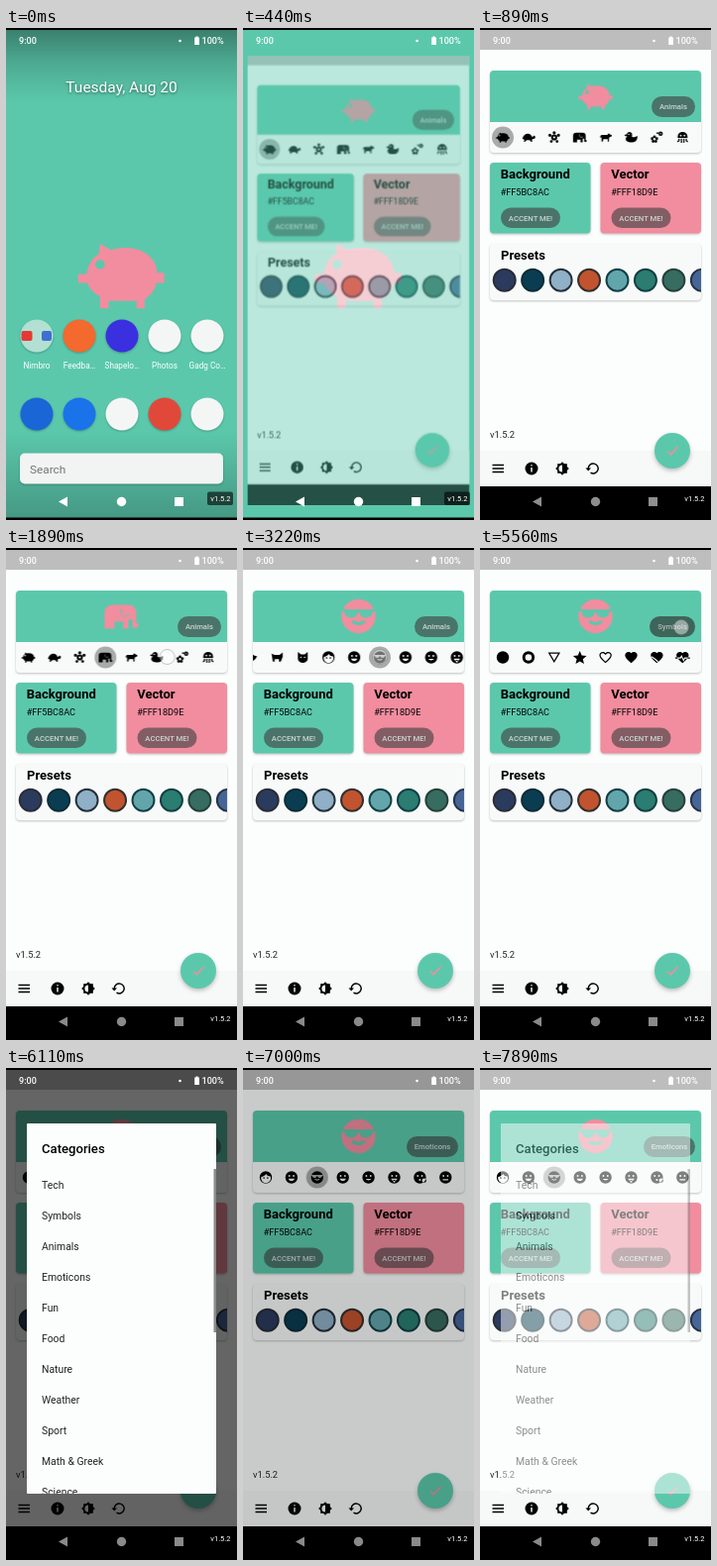
Write an HTML page that moves like this. It is 233 by 497 pixels and loops after 8000 ms.

```html
<!DOCTYPE html>
<html lang="en">
<head>
<meta charset="utf-8">
<title>Wallpaper picker</title>
<style>
  html, body { margin: 0; width: 100%; height: 100%; overflow: hidden; background: #000; }
  #stage { position: relative; width: 233px; height: 497px; overflow: hidden; }
  #stage > svg { position: absolute; left: 0; top: 0; width: 233px; height: 497px; }
  text { font-family: Roboto, sans-serif; }
  path { fill-rule: evenodd; }
  .card { filter: drop-shadow(0 1px .9px rgba(0, 0, 0, .24)); }
  .title { font-size: 13px; font-weight: 700; }
  .hex { font-size: 9.1px; }
  .chip { fill: rgba(66, 66, 66, .62); }
  .chipText { font-size: 7.7px; font-weight: 500; fill: #c9d6d1; text-anchor: middle; }
  .label { font-size: 8.2px; fill: #fff; text-anchor: middle; }
  .status { font-size: 9.1px; font-weight: 500; fill: #fff; }
  #app { transform-origin: 117px 411px; }
</style>
</head>
<body>
<div id="stage">
  <svg id="home">
    <defs>
      <linearGradient id="shade" x1="0" y1="0" x2="0" y2="1">
        <stop offset="0" stop-opacity=".37"/>
        <stop offset=".07" stop-opacity=".15"/>
        <stop offset=".15" stop-opacity="0"/>
        <stop offset=".82" stop-opacity="0"/>
        <stop offset="1" stop-opacity=".24"/>
      </linearGradient>
    </defs>
    <rect width="233" height="497" fill="#5bc8ac"/>
    <g id="wallPig"></g>
    <g id="launcher">
      <rect width="233" height="497" fill="url(#shade)"/>
      <text x="116.5" y="65.400" font-size="15.500" fill="#fff" text-anchor="middle" style="filter:drop-shadow(0 1px 1.5px rgba(0,0,0,.5))">Tuesday, Aug 20</text>
      <g id="apps"></g>
      <rect class="card" x="14" y="429.500" width="205" height="31" rx="5" fill="#f1f4f2"/>
      <text x="24" y="449.500" font-size="11.800" fill="#757575">Search</text>
    </g>
  </svg>

  <svg id="app">
    <defs>
      <clipPath id="rowClip"><rect x="10" y="95" width="213" height="31"/></clipPath>
      <clipPath id="presetClip"><rect x="10" y="218" width="213" height="57" rx="4"/></clipPath>
    </defs>
    <rect width="233" height="497" fill="#fcfefd"/>
    <rect width="233" height="22" fill="#bdbdbd"/>

    <rect class="card" x="10" y="43" width="213" height="83" rx="4" fill="#f8faf9"/>
    <path d="M10 95V47a4 4 0 0 1 4-4H219a4 4 0 0 1 4 4V95Z" fill="#5bc8ac"/>
    <g id="art" fill="#f18d9e"></g>
    <g id="chips"></g>
    <g clip-path="url(#rowClip)"><g id="strip"></g></g>

    <g id="colors"></g>

    <rect class="card" x="10" y="218" width="213" height="57" rx="4" fill="#f8faf9"/>
    <text class="title" x="21" y="234">Presets</text>
    <g id="presets" clip-path="url(#presetClip)"></g>

    <text x="10" y="414" font-size="9.300" fill="#222">v1.5.2</text>
    <rect y="427" width="233" height="36" fill="#f7f9f8"/>
    <path d="M12.500 441.500H24M12.500 445H24M12.500 448.500H24" stroke="#000" stroke-width="1.300"/>
    <circle cx="52" cy="445" r="6.500"/>
    <path d="M52 444V448.500M52 441.200V442.600" stroke="#fff" stroke-width="1.400"/>
    <g transform="translate(83 445)">
      <rect x="-4.800" y="-4.800" width="9.600" height="9.600"/>
      <rect x="-4.800" y="-4.800" width="9.600" height="9.600" transform="rotate(45)"/>
      <path d="M0-3.600A3.600 3.600 0 0 0 0 3.600Z" fill="#f7f9f8"/>
    </g>
    <path d="M109.200 445A5 5 0 1 1 111.500 449.200" fill="none" stroke="#000" stroke-width="1.400"/>
    <path d="M106.500 444.500H112L109.200 447.600Z"/>
    <circle cx="194" cy="427" r="18" fill="#5bc8ac" style="filter:drop-shadow(0 2px 2px rgba(0,0,0,.25))"/>
    <path d="M189 427.500L192.300 430.800L199.500 423" fill="none" stroke="#f18d9e" stroke-width="1.500"/>
    <rect y="463" width="233" height="34"/>
  </svg>

  <svg id="dim"><rect width="233" height="463"/></svg>

  <svg id="dialog">
    <defs><clipPath id="listClip"><rect x="21" y="100" width="191" height="330"/></clipPath></defs>
    <rect x="21" y="56" width="191" height="374" rx="1" fill="#fcfefd"/>
    <text x="36" y="86" font-size="13.100" font-weight="500">Categories</text>
    <g id="items" clip-path="url(#listClip)" font-size="10.400" fill="#222"></g>
    <rect x="209.500" y="102" width="2.500" height="165" fill="#8b8b8b"/>
  </svg>

  <svg id="top">
    <rect width="233" height="2"/>
    <rect y="494.500" width="233" height="3"/>
    <text class="status" x="13" y="16.200">9:00</text>
    <circle cx="175.500" cy="13" r="1.300" fill="#fff"/>
    <path d="M191.500 8.500H193.700V9.500H195V17H190.200V9.500H191.500Z" fill="#fff"/>
    <text class="status" x="197.500" y="16.200">100%</text>
    <g id="nav">
      <path d="M53 478.500L62 473.500V483.500Z"/>
      <circle cx="116.500" cy="478.500" r="4.700"/>
      <rect x="170" y="474" width="9" height="9"/>
    </g>
    <rect x="203" y="468.500" width="26" height="13.500" rx="2" fill="rgba(0,0,0,.6)"/>
    <text x="206.300" y="478" font-size="7.500" fill="#fff">v1.5.2</text>
    <circle id="touch" r="7.500" fill="rgba(255,255,255,.45)" stroke="rgba(110,110,110,.4)"/>
  </svg>
</div>

<script>
const LOOP = 8000, STEP = 25.9, FIRST = 22.5;
const $ = id => document.getElementById(id);
const sheet = document.head.appendChild(document.createElement('style'));

// frames: [ms, css] pairs turned into looping CSS keyframes
function keys(id, frames, timing = 'linear') {
  const body = [...frames, [LOOP, frames.at(-1)[1]]]
    .map(([ms, css]) => `${ms / LOOP * 100}%{${css}}`).join('');
  sheet.append(`@keyframes k-${id}{${body}}#${id}{animation:k-${id} ${LOOP}ms ${timing} infinite}\n`);
}
const fade = (id, pairs, timing) => keys(id, pairs.map(([ms, o]) => [ms, `opacity:${o}`]), timing);
const show = (id, from, to) => fade(id, [...(from ? [[0, 0]] : []), [from, 1], ...(to ? [[to, 0]] : [])], 'step-end');

// icon shapes on a 24 unit grid
const disc = (x, y, r) => `M${x - r} ${y}a${r} ${r} 0 1 0 ${2 * r} 0a${r} ${r} 0 1 0 ${-2 * r} 0Z`;
const face = more => disc(12, 12, 10) + more;
const eyes = disc(8.5, 9.5, 1.5) + disc(15.5, 9.5, 1.5);
const smile = 'M7 14H17C16 19 8 19 7 14Z';
const heart = 'M12 21.3L10.5 20C5.4 15.4 2 12.3 2 8.5C2 5.4 4.4 3 7.5 3C9.2 3 10.9 3.8 12 5.1C13.1 3.8 14.8 3 16.5 3C19.6 3 22 5.4 22 8.5C22 12.3 18.6 15.4 13.5 20Z';

const symbols = [
  disc(12, 12, 10),
  disc(12, 12, 10) + disc(12, 12, 5.3),
  'M2 4H22L12 21ZM5.5 6H18.5L12 17Z',
  'M12 1.5L15.1 8.8L23 9.5L17 14.7L18.8 22.5L12 18.3L5.2 22.5L7 14.7L1 9.5L8.9 8.8Z',
  heart + 'M12 18.7C7 14.200 4 11.500 4 8.500C4 4.500 9 3.500 11.200 7.500H12.800C15 3.500 20 4.500 20 8.500C20 11.500 17 14.200 12 18.700Z',
  heart,
  heart + 'M3 11.5C8 15 11 17 13 20L14.500 19C12 15.500 9 13.500 4 10Z',
  heart + 'M0 12H8L10.500 8L13.500 15L15 12H24V14H16L13.500 19L10.500 12L9 14H0Z'
];
const animals = [
  'M6.6 4L9.4 5.6C10.5 5.2 11.8 5 13 5C17.6 5 21 7.600 21.200 11.400H23V14H21C20.600 15.800 19.600 17.200 18 18.200V20.500H15.900V18.600H8.800V20.500H6.600V17.500C5 16.600 3.800 15.300 3.300 14H1V11.700H3.200C3.500 9.600 4.500 7.700 6.300 6.600Z' + disc(6.6, 9.3, 1.2),
  'M2 14C4 8 8 6 11 6C15 6 17 9 18 12L20 9.500C21.500 9 23 10 23 12C23 13.500 21 14.500 19 14.500L17.500 16L18.500 19H15.500L14 16.500H9L7 19H4L5.500 16Z',
  disc(12, 12, 5) + disc(12, 12, 1.8) + disc(12, 4.3, 2.5) + disc(5, 8.5, 2.5) + disc(19, 8.5, 2.5) + disc(7.3, 18.6, 2.3) + disc(16.7, 18.6, 2.3),
  'M1 20V9.500A5 5 0 0 1 6 4.500H16.500A5 5 0 0 1 21.500 9.500V16.500H23V17.500A1.800 1.800 0 0 1 19 17.500V14H16.500V20H13V15.500H7.500V20ZM11.500 7H12.200V10.500A2.500 2.500 0 0 0 16.500 10.500H17.200A3.200 3.200 0 0 1 11.500 10.500Z',
  'M4 9L5.500 8H15L17 5L18 6.500L22 8.500V10.500L18.500 11.500L17.500 14V19H15.500V15H8.500L7.500 19H5.500V14L4.500 11L2.500 13Z',
  'M9 3A5 5 0 0 1 13.500 8C13.500 10 12.500 11 14 11.500C17 12 19 11 22 9.500C22.500 15 20 20 14 20H10C5 20 3 17 3 14.500C3 12 5 11.500 5.500 10.500L1.500 9.500V7.500L4.500 7A5 5 0 0 1 9 3Z' + disc(8, 7, 1.1),
  [[8, 11], [4.3, 14], [5.8, 18.4], [10.2, 18.4], [11.7, 14]].map(p => disc(...p, 2.3)).join('') + disc(18, 6, 3.6) + disc(18, 6, 1) + disc(12.8, 5, 1.4),
  'M4 11A8 8 0 0 1 20 11V13H4ZM5 14H7V18L4 20L3 18.500L5 17ZM17 14H19V17L21 18.500L20 20L17 18ZM9 14H11V21H9ZM13 14H15V21H13Z' + disc(9, 9, 1.4) + disc(15, 9, 1.4),
  'M2 12C6 6 13 6 17 11L22 7V17L17 13C13 18 6 18 2 12Z' + disc(6.5, 11, 1),
  'M3 8L8 4C13 5 13 9 21 10C19 17 12 19 8 18L6 21V16C4 13 6 10 3 8Z',
  'M3 6L8 8H16L21 4V11L18 19H15V15H8V19H5Z',
  'M4 3L9 7H15L20 3V14A8 7 0 0 1 4 14Z' + disc(9, 12, 1.2) + disc(15, 12, 1.2)
];
const cool = face('M3.200 7.300L4 8H20L20.800 7.300L21.400 8.600L20 10C20 11.800 18 12.800 16.300 12.800C14.300 12.800 12.750 11.800 12.750 10H11.250C11.250 11.800 9.700 12.800 7.700 12.800C6 12.800 4 11.800 4 10L2.600 8.600ZM7.800 15.400L9.200 14C10 15.600 14 15.600 14.800 14L16.200 15.400C14.500 17.800 9.500 17.800 7.800 15.400Z');
const emoticons = [
  face('M4.500 11C9 10.500 11 9 12.500 6.500C14 9.500 17 10.500 19.700 10.500A8 8 0 1 1 4.500 11Z' + disc(9, 13, 1.3) + disc(15, 13, 1.3)),
  face(eyes + smile),
  cool,
  face(eyes + smile),
  face(eyes + 'M7.500 14.500H16.500C15 17.500 9 17.500 7.500 14.500Z'),
  face(eyes + smile + 'M10.500 16H13.500V19A1.500 1.500 0 0 1 10.500 19Z'),
  face(eyes + disc(12, 16, 1.7) + disc(19, 17, 3.5)),
  face(eyes + 'M7.500 15H16.500V17H7.500Z')
];
const icon = (d, x, y, s) => `<path d="${d}" transform="translate(${x - 12 * s} ${y - 12 * s}) scale(${s})"/>`;

// home screen
$('wallPig').innerHTML = `<path d="${animals[0]}" fill="#f18d9e" transform="translate(68.800 202.200) scale(3.950)"/>`;
const cols = [31, 74, 117, 160, 203];
const rowOne = [['#b2e0d3', 'Nimbro'], ['#f4692e', 'Feedba…'], ['#3a30e0', 'Shapelo…'], ['#f4f6f5', 'Photos'], ['#f4f6f5', 'Gadg Co…']];
const dock = ['#1a66d6', '#1a73e8', '#f4f6f5', '#e0493a', '#f4f6f5'];
const dot = (x, y, c) => `<circle class="card" cx="${x}" cy="${y}" r="16.500" fill="${c}"/>`;
$('apps').innerHTML = cols.map((x, i) =>
  dot(x, 311, rowOne[i][0]) + dot(x, 390, dock[i]) +
  `<text class="label" x="${x}" y="344">${rowOne[i][1]}</text>`).join('') +
  '<rect x="15.500" y="306" width="11" height="10" rx="2" fill="#e53935"/><rect x="36" y="306" width="10" height="10" rx="2" fill="#3f6fd0"/>';

// icon row, with the selection mark riding along
$('strip').innerHTML = '<circle id="mark" cy="110.500" r="11" fill="#a9aaaa"/>' +
  [...symbols, ...animals, ...emoticons].map((d, i) => icon(d, FIRST + i * STEP + .5, 110.5, .62)).join('');
const at = i => `transform:translateX(${FIRST + i * STEP + .5}px)`;
keys('mark', [[0, at(8)], [1150, at(9)], [1550, at(11)], [3200, at(22)]], 'step-end');

const art = [[animals[0], 0, 1150], [animals[1], 1150, 1550], [animals[3], 1550, 3200], [cool, 3200, 0]];
$('art').innerHTML = art.map(([d], i) => `<g id="art${i}">${icon(d, 116.5, 69, i == 3 ? 1.72 : 1.55)}</g>`).join('');
art.forEach(([, from, to], i) => show('art' + i, from, to));

const chips = [['Animals', 44], ['Symbols', 46], ['Emoticons', 52]];
$('chips').innerHTML = chips.map(([name, w], i) =>
  `<g id="chip${i}"><rect class="chip" x="${217 - w}" y="69" width="${w}" height="21" rx="10.500"/>
   <text class="chipText" x="${217 - w / 2}" y="82.300">${name}</text></g>`).join('') +
  '<rect id="press" x="171" y="69" width="46" height="21" rx="10.500"/>';
show('chip0', 0, 4700);
show('chip1', 4700, 6720);
show('chip2', 6720, 0);
fade('press', [[0, 0], [3600, 0], [3680, .2], [3780, 0], [5330, 0], [5500, .2], [5700, 0], [7440, 0], [7600, .2], [7830, 0]]);

$('colors').innerHTML = [[10, '#5bc8ac', 'Background', '#FF5BC8AC'], [121.5, '#f18d9e', 'Vector', '#FFF18D9E']].map(([x, c, name, hex]) =>
  `<rect class="card" x="${x}" y="136" width="101.500" height="71.500" rx="4" fill="${c}"/>
   <text class="title" x="${x + 10.7}" y="152.200">${name}</text>
   <text class="hex" x="${x + 10.7}" y="168.800">${hex}</text>
   <rect class="chip" x="${x + 11}" y="181.500" width="60" height="20.500" rx="10.250"/>
   <text class="chipText" x="${x + 41}" y="194.600">ACCENT ME!</text>`).join('');

const swatches = [['#2a3b5e', '#2a2c36'], ['#0a3d52', '#0c2c36'], ['#8fb0c6', '#25303c'], ['#c2532f', '#33302f'],
  ['#62a6ac', '#123f46'], ['#2a7d70', '#123f46'], ['#376c60', '#26403c'], ['#456596', '#26324a']];
$('presets').innerHTML = swatches.map(([c, ring], i) =>
  `<circle cx="${24.7 + i * 28.45}" cy="254.800" r="11" fill="${c}" stroke="${ring}" stroke-width="2"/>`).join('');

$('items').innerHTML = ['Tech', 'Symbols', 'Animals', 'Emoticons', 'Fun', 'Food', 'Nature', 'Weather', 'Sport', 'Math &amp; Greek', 'Science']
  .map((name, i) => `<text x="36" y="${121.7 + i * 31}">${name}</text>`).join('');

// motion
fade('launcher', [[0, 1], [180, 1], [400, 0]]);
const win = (o, s, a, b) => `opacity:${o};transform:scale(${s});clip-path:inset(${a}px 0 ${b}px)`;
keys('app', [[0, win(0, .9, 40, 40)], [290, win(0, .9, 40, 40)], [440, win(.6, .96, 13, 13)], [600, win(1, .985, 4, 4)], [800, win(1, 1, 0, 0)]]);
keys('nav', [[0, 'fill:#fff'], [600, 'fill:#fff'], [900, 'fill:#8a8a8a']]);

const slide = px => `transform:translateX(${-px}px)`;
const end = 17.56 * STEP;
keys('strip', [[0, slide(8 * STEP)], [1890, slide(8 * STEP)], [2150, slide(310)], [2250, slide(334)], [2350, slide(345)],
  [2400, slide(345)], [2650, slide(430)], [2760, slide(448)], [2900, slide(end)], [4700, slide(end)],
  [4701, slide(0)], [6720, slide(0)], [6721, slide(20 * STEP)]]);

fade('dialog', [[0, 0], [3780, 0], [3900, 1], [4700, 1], [5000, 0], [5670, 0], [5790, 1], [6700, 1], [7000, 0], [7830, 0], [7950, 1]]);
fade('dim', [[0, 0], [3840, 0], [4150, .6], [4700, .6], [5150, 0], [5730, 0], [6040, .6], [6700, .6], [7150, 0], [7890, 0], [7999, .2]]);

// touches: start, end, x, y and, for swipes, final x
const touches = [[110, 220, 117, 311], [1000, 1150, 49, 110], [1450, 1580, 101, 110], [1890, 2150, 163, 110, 60],
  [2400, 2650, 170, 110, 85], [3060, 3220, 138, 110], [3600, 3740, 203, 80], [4440, 4600, 60, 149],
  [5330, 5620, 203, 80], [6330, 6460, 60, 211], [7440, 7770, 203, 80]];
const spot = (o, x, y) => `opacity:${o};transform:translate(${x}px,${y}px)`;
keys('touch', [[0, spot(0, 117, 311)], ...touches.flatMap(([a, b, x, y, x2 = x]) =>
  [[a - 50, spot(0, x, y)], [a, spot(1, x, y)], [b, spot(1, x2, y)], [b + 50, spot(0, x2, y)]])]);
</script>
</body>
</html>
```
